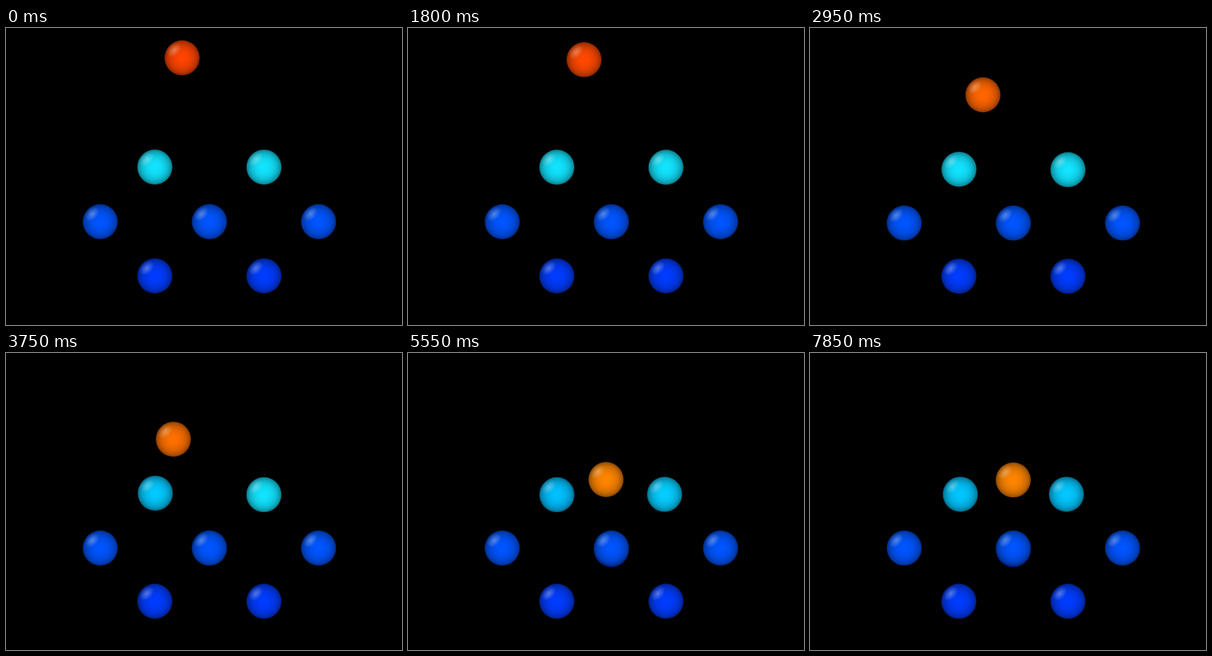
Write an HTML page with a canvas that moves like this. It is 640 px wide and 480 px high and loops after 8 s.

```html
<!DOCTYPE html>
<html lang="en">
<head>
<meta charset="utf-8">
<title>Atom settling on a surface</title>
<style>
  html, body { margin: 0; width: 100%; height: 100%; overflow: hidden; background: #000; }
  canvas { display: block; width: 640px; height: 480px; }
</style>
</head>
<body>
<canvas id="stage" width="640" height="480"></canvas>
<script>
const LOOP = 8000, STEP = 50, RADIUS = 28.4;
const SPACING = 88.2, LEFT = 152.3, MIDDLE = 313;
const MID_BLUE = [0, 85, 255], DEEP_BLUE = [0, 60, 255];
const ctx = document.getElementById('stage').getContext('2d');

const clamp = (v, lo, hi) => Math.min(hi, Math.max(lo, v));
const ease = (t, from, to) => {
  const u = clamp((t - from) / (to - from), 0, 1);
  return u * u * (3 - 2 * u);
};

// Monotone cubic curve through rows of [time, ...values].
function curve(rows) {
  const last = rows.length - 1;
  const slope = (i, c) => (rows[i + 1][c] - rows[i][c]) / (rows[i + 1][0] - rows[i][0]);
  const tangent = (i, c) => {
    if (i === 0 || i === last) return 0;
    const a = slope(i - 1, c), b = slope(i, c);
    return a * b > 0 ? 2 * a * b / (a + b) : 0;
  };
  return t => {
    if (t >= rows[last][0]) return rows[last].slice(1);
    let i = 0;
    while (t >= rows[i + 1][0]) i++;
    const span = rows[i + 1][0] - rows[i][0];
    const u = (t - rows[i][0]) / span, v = 1 - u;
    return rows[i].slice(1).map((from, k) => {
      const c = k + 1;
      return from * (1 + 2 * u) * v * v + rows[i + 1][c] * u * u * (3 - 2 * u)
        + span * u * v * (v * tangent(i, c) - u * tangent(i + 1, c));
    });
  };
}

// The free atom drops, slides left, then rolls into the hollow.
const freePath = curve([
  [0, 284.6, 48.2], [1800, 284.5, 51.2], [2600, 283, 81.3], [2950, 279.5, 108],
  [3750, 270.5, 139.3], [4650, 287.8, 180.7], [5100, 308, 203],
  [5550, 320, 204.5], [7850, 328.5, 205.2]
]);
const buriedShift = curve([[0, 0], [4200, 0], [4650, -2.8], [5400, 2.4]]);

// Attraction at long range, repulsion at short range.
function pull(distance) {
  const s = (83 / distance) ** 6;
  return Math.max(-1.3, 10.4 * (s - s * s));
}

function drawSurfaceAtom(x, y, free) {
  const dx = free[0] - x, dy = free[1] - y, distance = Math.hypot(dx, dy);
  const k = pull(distance) / distance;
  const green = clamp(180 + 0.8 * (distance - 68), 180, 228);
  const red = clamp((green - 196) * 0.56, 0, 18);
  drawBall(x + dx * k, y + dy * k, [red, green, 255]);
}

function disc(radius, stops) {
  const fill = ctx.createRadialGradient(0, 0, 0, 0, 0, radius);
  stops.forEach(([at, color]) => fill.addColorStop(at, color));
  ctx.fillStyle = fill;
  ctx.beginPath();
  ctx.arc(0, 0, radius, 0, 2 * Math.PI);
  ctx.fill();
}

function drawBall(x, y, rgb) {
  const stops = Array.from({ length: 13 }, (_, i) => {
    const r = Math.sin(i / 12 * Math.PI / 2);
    const light = 0.4 + 0.6 * Math.sqrt(1 - r * r);
    return [r, `rgb(${rgb.map(c => Math.round(c * light))})`];
  });
  ctx.save();
  ctx.translate(x, y);
  disc(RADIUS, stops);
  ctx.translate(-13, -12.5);
  ctx.rotate(-Math.PI / 4);
  ctx.scale(1, 0.65);
  disc(14, [[0, 'rgba(255,255,255,.33)'], [1, 'rgba(255,255,255,0)']]);
  ctx.restore();
}

function render(now) {
  const t = Math.floor((now % LOOP) / STEP) * STEP;
  const free = freePath(t);
  const sink = ease(t, 1600, 2950);
  const column = n => LEFT + n * SPACING;
  const middle = MIDDLE + 2.2 * sink;

  ctx.fillStyle = '#000';
  ctx.fillRect(0, 0, 640, 480);
  drawBall(column(2), middle + buriedShift(t)[0], DEEP_BLUE);
  for (const n of [1, 3]) drawBall(column(n), MIDDLE + SPACING - 0.6 + 0.6 * sink, DEEP_BLUE);
  for (const n of [0, 2, 4]) drawBall(column(n), middle, MID_BLUE);
  for (const n of [1, 3]) drawSurfaceAtom(column(n), MIDDLE - SPACING + 4.2 * sink, free);
  const fall = clamp((free[1] - 48) / 157, 0, 1);
  drawBall(...free, [255, 68 + 65 * fall ** 0.7, 0]);
}

let start;
function tick(now) {
  start ??= now;
  render(now - start);
  requestAnimationFrame(tick);
}
render(0);
requestAnimationFrame(tick);
</script>
</body>
</html>
```
